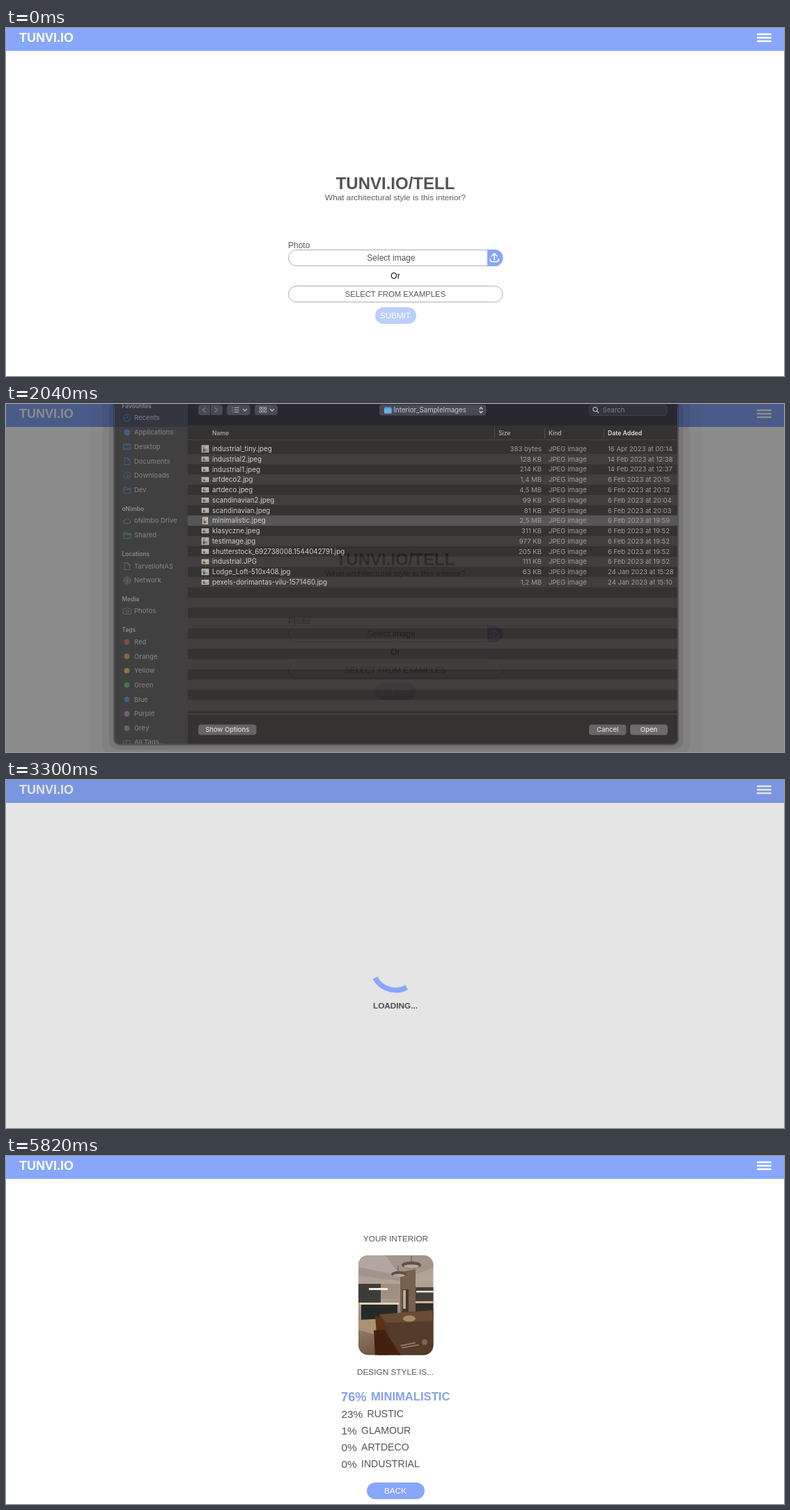
Animation, 1117 px wide and 501 px high, one loop 8000 ms. Source, as an HTML page with a canvas:

```html
<!DOCTYPE html>
<html lang="en">
<head>
<meta charset="utf-8">
<title>Interior style demo</title>
<style>
html, body { margin: 0; width: 100%; height: 100%; overflow: hidden; background: #fff; }
canvas { display: block; }
</style>
</head>
<body>
<canvas id="stage" width="1117" height="501"></canvas>
<script>
const W = 1117, H = 501, LOOP = 8000, STEP = 70;
const BLUE = '#88a7fa', INK = '#545454';
const SANS = '"Liberation Sans", Arial, sans-serif';
const UI = 'Inter, Roboto, sans-serif';
const stage = document.getElementById('stage').getContext('2d');
const sheet = document.createElement('canvas');
sheet.width = W;
sheet.height = H;
const sheetCtx = sheet.getContext('2d');
let c = stage;

const clamp = v => Math.max(0, Math.min(1, v));

// y is the middle of the capital letters
function text(str, x, y, size, color, { align = 'left', weight = 400, font = SANS } = {}) {
  c.font = `${weight} ${size}px ${font}`;
  c.textAlign = align;
  c.fillStyle = color;
  c.fillText(str, x, y + size * 0.36);
}
function rect(x, y, w, h, color) {
  c.fillStyle = color;
  c.fillRect(x, y, w, h);
}
function round(x, y, w, h, r, fill, stroke, line = 1) {
  c.beginPath();
  c.roundRect(x, y, w, h, r);
  if (fill) { c.fillStyle = fill; c.fill(); }
  if (stroke) { c.strokeStyle = stroke; c.lineWidth = line; c.stroke(); }
}
function poly(points, color) {
  c.beginPath();
  points.forEach(([x, y]) => c.lineTo(x, y));
  c.fillStyle = color;
  c.fill();
}
function path(d, x, y, color, line = 1) {
  c.save();
  c.translate(x, y);
  c.strokeStyle = color;
  c.lineWidth = line;
  c.lineCap = c.lineJoin = 'round';
  c.stroke(new Path2D(d));
  c.restore();
}
function dot(x, y, r, color) {
  c.beginPath();
  c.arc(x, y, r, 0, Math.PI * 2);
  c.fillStyle = color;
  c.fill();
}

function drawHeader() {
  rect(0, 0, W, H, '#fff');
  rect(0, 0, W, 33, BLUE);
  text('TUNVI.IO', 19, 14, 18, '#fff', { weight: 700 });
  for (const y of [9, 14, 19]) round(1078, y - 1.3, 21, 2.6, 1, '#fff');
}

function drawForm(chosen) {
  const mid = { align: 'center' };
  text('TUNVI.IO/TELL', 559, 223, 24, INK, { align: 'center', weight: 700 });
  text('What architectural style is this interior?', 559, 244, 11.8, '#5c5c5c', mid);
  text('Photo', 405, 312.5, 12, '#5c5c5c');
  round(405.5, 319.5, 307.5, 23, 11.5, '#fff', '#aaacc0');
  round(691, 319, 22.5, 24, [0, 12, 12, 0], BLUE);
  path('M0 3V-6M-4 -2L0 -6L4 -2M-6 2V3Q-6 6 -3 6H3Q6 6 6 3V2', 701.2, 330.5, '#fff', 1.5);
  text(chosen ? 'minimalistic.jpeg' : 'Select image', 553, 331, 12, INK, mid);
  text('Or', 559, 357, 12, '#111', mid);
  round(405.5, 371.5, 307.5, 23, 11.5, '#fff', '#aaacc0');
  text('SELECT FROM EXAMPLES', 559, 383, 11.3, INK, mid);
  round(530, 402, 59, 24, 12, chosen ? BLUE : '#bccefc');
  text('SUBMIT', 559, 414, 11.6, '#fff', mid);
}

function drawLoading(t) {
  const start = (62 + 555 * (t - 3300) / 1750) * Math.PI / 180;
  rect(0, 0, W, H, 'rgba(0,0,0,.1)');
  c.beginPath();
  c.arc(559.5, 269, 33.5, start, start + Math.PI / 2);
  c.strokeStyle = BLUE;
  c.lineWidth = 7.5;
  c.lineCap = 'butt';
  c.stroke();
  text('LOADING...', 559, 325, 11.75, '#4d4d4d', { align: 'center', weight: 700 });
}

function drawPhoto() {
  c.save();
  c.beginPath();
  c.roundRect(506, 143, 107.5, 143.5, 14);
  c.clip();
  const wall = c.createLinearGradient(506, 143, 540, 286);
  wall.addColorStop(0, '#a69c94');
  wall.addColorStop(0.4, '#b3a596');
  wall.addColorStop(1, '#70543b');
  rect(506, 143, 108, 144, wall);
  poly([[506, 143], [614, 143], [614, 160], [566, 180], [506, 172]], '#a1958d');
  poly([[506, 143], [545, 143], [566, 172], [506, 160]], '#b1a7a0');
  rect(506, 184, 32, 27, '#3d3c39');
  rect(538, 184, 28, 22, '#9f9182');
  rect(521, 190, 27, 3, '#f1eee6');
  rect(587, 189, 27, 22, '#454039');
  rect(589, 194, 25, 2.5, '#eee6d7');
  rect(508, 211, 56, 3, '#e0cfb2');
  rect(510, 214, 52, 22, '#252a28');
  rect(587, 209, 27, 19, '#d2b994');
  rect(587, 212, 27, 17, '#302e2a');
  poly([[506, 236], [545, 234], [532, 258], [506, 250]], '#aa9275');
  poly([[566, 167], [588, 163], [588, 234], [566, 232]], '#76604e');
  rect(569, 192, 9, 34, '#45372d');
  rect(570, 193, 4, 27, '#b9aa97');
  path('M0 0V10M19 -16V-4', 563, 158, '#504740', 0.8);
  for (const [x, y, r] of [[564, 170, 11], [582, 157, 14]]) {
    c.beginPath();
    c.ellipse(x, y, r, r * 0.38, 0, 0, Math.PI * 2);
    c.fillStyle = '#5e5148';
    c.fill();
    c.beginPath();
    c.ellipse(x, y + 2, r * 0.8, r * 0.2, 0, 0, Math.PI * 2);
    c.fillStyle = '#b9a797';
    c.fill();
  }
  path('M0 0L-3 12M8 0L11 12M0 4H9', 547, 224, '#39302a');
  poly([[536, 228], [614, 222], [614, 287], [563, 287], [540, 252]], '#553b2a');
  poly([[536, 228], [614, 222], [614, 238], [546, 240]], '#694a34');
  poly([[530, 229], [541, 235], [551, 264], [548, 287], [534, 287]], '#5e3016');
  poly([[528, 251], [543, 250], [567, 287], [530, 287]], '#44210f');
  c.beginPath();
  c.ellipse(579, 234, 9, 4.5, 0, 0, Math.PI * 2);
  c.fillStyle = '#aa8963';
  c.fill();
  path('M0 4L20 0M2 7L25 3', 567, 269, '#9d8670', 1.5);
  dot(601, 268, 4, '#806451');
  c.restore();
}

function drawResult() {
  const mid = { align: 'center' };
  text('YOUR INTERIOR', 559.5, 118.5, 11.7, INK, mid);
  drawPhoto();
  text('DESIGN STYLE IS...', 559, 311, 11.8, INK, mid);
  const bold = { weight: 700 };
  text('76%', 481, 346, 18.3, '#84a1ec', bold);
  text('MINIMALISTIC', 524, 346, 16.6, '#84a1ec', bold);
  [['23%', 'RUSTIC'], ['1%', 'GLAMOUR'], ['0%', 'ARTDECO'], ['0%', 'INDUSTRIAL']].forEach(([share, style], i) => {
    text(share, 481.5, 371 + 24 * i, 15.4, INK);
    text(style, i ? 510 : 518.5, 371 + 24 * i, 14.1, INK);
  });
  round(518, 470, 83, 24, 12, BLUE);
  text('BACK', 559, 482, 11.8, '#fff', mid);
}

const FILES = `industrial_tiny.jpeg|383 bytes|16 Apr 2023 at 00:14
industrial2.jpeg|128 KB|14 Feb 2023 at 12:38
industrial1.jpeg|214 KB|14 Feb 2023 at 12:37
artdeco2.jpg|1,4 MB|6 Feb 2023 at 20:15
artdeco.jpeg|4,5 MB|6 Feb 2023 at 20:12
scandinavian2.jpeg|99 KB|6 Feb 2023 at 20:04
scandinavian.jpeg|81 KB|6 Feb 2023 at 20:03
minimalistic.jpeg|2,5 MB|6 Feb 2023 at 19:59
klasyczne.jpeg|311 KB|6 Feb 2023 at 19:52
testimage.jpg|977 KB|6 Feb 2023 at 19:52
shutterstock_692738008.1544042791.jpg|205 KB|6 Feb 2023 at 19:52
industrial.JPG|111 KB|6 Feb 2023 at 19:52
Lodge_Loft-510x408.jpg|63 KB|24 Jan 2023 at 15:28
pexels-dorimantas-vilu-1571460.jpg|1,2 MB|24 Jan 2023 at 15:10`.split('\n').map(row => row.split('|'));
const PICKED = 7;

const ICONS = {
  clock: 'M5 0A5 5 0 1 1 -5 0A5 5 0 1 1 5 0M0 -3V0H-2',
  down: 'M5 0A5 5 0 1 1 -5 0A5 5 0 1 1 5 0M0 -2.5V2.5M-2 .5L0 2.5L2 .5',
  desk: 'M-5 -4H5V4H-5ZM-5 -2H5M-5 2.5H5',
  page: 'M-3.5 -5H1L4 -2V5H-3.5ZM1 -5V-2H4',
  folder: 'M-5 4V-4H-1L0 -2.5H5V4ZM-5 -1H5',
  cloud: 'M-3 4H3A2.7 2.7 0 0 0 3.5 -1A3.5 3.5 0 0 0 -3 -1A2.5 2.5 0 0 0 -3 4',
  globe: 'M5 0A5 5 0 1 1 -5 0A5 5 0 1 1 5 0M-5 0H5M0 -5V5M-3.5 -3Q0 0 3.5 -3M-3.5 3Q0 0 3.5 3',
  camera: 'M-5.5 -3H-2.5L-1.5 -4.5H1.5L2.5 -3H5.5V4.5H-5.5ZM2 .5A2 2 0 1 1 -2 .5A2 2 0 1 1 2 .5',
  tags: 'M-1 0A2.5 2.5 0 1 1 -1 -.1M-1 -3H2A3 3 0 0 1 2 3H-1'
};
const SKY = '#2b8ff5', TEAL = '#55c3c9', GREY = '#96969a';
const PLACES = [
  ['Recents', 23, 'clock', SKY], ['Applications', 44, null, SKY], ['Desktop', 64.5, 'desk', SKY],
  ['Documents', 85.5, 'page', SKY], ['Downloads', 106, 'down', SKY], ['Dev', 127, 'folder', SKY],
  ['oNimbo Drive', 171, 'cloud', TEAL], ['Shared', 192, 'folder', TEAL],
  ['TarvelloNAS', 236.5, 'page', GREY], ['Network', 257, 'globe', GREY],
  ['Photos', 301, 'camera', GREY], ['All Tags...', 490, 'tags', GREY]
];
const GROUPS = [['Favourites', 6], ['oNimbo', 154], ['Locations', 219], ['Media', 284], ['Tags', 328]];
const TAGS = [['Red', '#ea5350'], ['Orange', '#f7a02c'], ['Yellow', '#fbe62f'], ['Green', '#2fdc40'],
  ['Blue', '#1f95fc'], ['Purple', '#e274dc'], ['Grey', '#9b9b9c']];

function drawSidebar(active) {
  rect(155, 0, 106, 494, active ? '#363638' : '#2e2e2f');
  const ui = { font: UI, weight: 500 };
  for (const [name, y] of GROUPS) text(name, 166.5, y, 8.4, active ? '#858588' : '#8c8c8e', { font: UI, weight: 600 });
  c.globalAlpha = active ? 1 : 0.42;
  for (const [name, y, icon, color] of PLACES) {
    if (icon) path(ICONS[icon], 174, y, color);
    else dot(174, y, 4.5, color);
    text(name, 184, y, 9.5, '#e8e8e8', ui);
  }
  TAGS.forEach(([name, color], i) => {
    const y = 345.5 + 20.7 * i;
    dot(173.5, y, 3.9, color);
    text(name, 184, y, 9.5, '#e8e8e8', ui);
  });
  c.globalAlpha = 1;
}

function drawToolbar(active) {
  const field = '#49474a';
  round(276, 4, 17, 15, [4, 0, 0, 4], field);
  round(294, 4, 17, 15, [0, 4, 4, 0], field);
  path('M2 -3L-1.5 0L2 3', 284, 11.5, '#858487', 1.2);
  path('M-2 -3L1.5 0L-2 3', 302, 11.5, '#858487', 1.2);
  round(317, 4, 33.5, 15, 4, field);
  round(357, 4, 33, 15, 4, field);
  path('M0 -3H.2M3 -3H9M0 0H.2M3 0H9M0 3H.2M3 3H9', 325, 11.5, '#cfcfd0', 1.1);
  for (let i = 0; i < 6; i++) round(364 + i % 3 * 3.7, 7.5 + (i > 2) * 4.6, 2.5, 3, 0.5, null, '#cfcfd0', 0.9);
  for (const x of [343, 382]) path('M-2.5 -1L0 1.5L2.5 -1', x, 11.5, '#d8d8d8', 1.2);
  round(536, 4, 153.5, 15.5, 4, field);
  if (active) round(676, 5, 12, 13.5, 3, '#1e62d4');
  path('M-2 -1.5L0 -4L2 -1.5M-2 1.5L0 4L2 1.5', 682, 11.8, '#fff', 1.2);
  round(543, 7.5, 10.5, 9, 1.5, '#4bacec');
  rect(543, 9.5, 10.5, 7, '#72c4f6');
  text('Interior_SampleImages', 556.5, 11.8, 9.7, '#e4e4e4', { font: UI });
  round(837, 4.5, 112, 15, 4, '#2b292b', '#3c3a3c');
  path('M2 -.8A3 3 0 1 1 -4 -.8A3 3 0 1 1 2 -.8M1.2 1.5L4 4.3', 847, 11.5, '#d5d5d5', 1.2);
  text('Search', 856.5, 12, 9.6, '#88868a', { font: UI });
}

function drawThumb(i, y) {
  const tall = i === PICKED;
  const h = tall || i === 0 || i === 9 ? 10.5 : i === 12 ? 9 : 7;
  const w = tall ? 8 : 10.5;
  const x = 286 - w / 2;
  rect(x, y - h / 2, w, h, '#dcd9d5');
  rect(x + 1, y - h / 2 + 1, w - 2, h - 2, ['#8d9692', '#9b9388', '#aaaaaa', '#b0a185'][i % 4]);
  rect(x + 2, y, w * 0.3, h / 2 - 1, '#55504c');
  rect(x + w * 0.55, y - h / 2 + 1.5, w * 0.25, h * 0.35, '#d2cdc4');
}

function drawList(selected, active) {
  const ui = { font: UI }, pitch = 14.77, top = 60.1;
  rect(261, 0, 704, 494, active ? '#1e1b1c' : '#221c1b');
  drawToolbar(active);
  rect(261, 34.5, 704, 1, '#383536');
  rect(261, 54, 704, 1, '#383536');
  for (const x of [701, 773, 858]) rect(x, 38, 1, 14, '#454243');
  text('Name', 296, 45, 8.6, '#bebcbd', { font: UI, weight: 500 });
  text('Size', 707, 45, 8.6, '#bebcbd', { font: UI, weight: 500 });
  text('Kind', 779, 45, 8.6, '#bebcbd', { font: UI, weight: 500 });
  text('Date Added', 864, 45, 8.7, '#f0f0f0', { font: UI, weight: 600 });
  for (let i = 1; i < 26; i += 2) rect(261, top + i * pitch, 704, pitch, active ? '#2b2829' : '#322c2b');
  if (selected) rect(261, top + PICKED * pitch, 704, pitch, active ? '#0d58cf' : '#4a4a4b');
  FILES.forEach(([name, size, date], i) => {
    const y = 67.5 + i * pitch;
    const soft = selected && active && i === PICKED ? '#fff' : '#a5a3a4';
    drawThumb(i, y);
    text(name, 296, y, 9.75, '#e4e2e3', ui);
    text(size, 769, y, 9.6, soft, { font: UI, align: 'right' });
    text('JPEG image', 779, y, 9.6, soft, ui);
    text(date, 864, y, 9.5, soft, ui);
  });
  rect(261, 449, 704, 1, '#434041');
  const button = (label, x, w, fill, color) => {
    round(x, 464.5, w, 15, 4, fill);
    text(label, x + w / 2, 472, 9.5, color, { font: UI, weight: 500, align: 'center' });
  };
  button('Show Options', 276, 83.5, '#5d5b5c', '#eee');
  button('Cancel', 837, 53.5, '#5d5b5c', '#eee');
  button('Open', 896, 54, selected ? (active ? '#2068dc' : '#656364') : '#353233', selected ? '#fff' : '#706e6f');
}

function renderSheet(selected, active) {
  c = sheetCtx;
  c.clearRect(0, 0, W, H);
  c.save();
  c.beginPath();
  c.roundRect(155, -20, 810, 513.5, 9);
  c.clip();
  drawSidebar(active);
  drawList(selected, active);
  c.restore();
  round(155.5, -20, 809, 513, 9, null, '#4b494b');
  c = stage;
}

// The shadow stays outside the sheet, so that the page shows through evenly
function drawShadow() {
  for (const [spread, shade] of [[35, 0.03], [17, 0.07], [7, 0.1], [1, 0.35]]) {
    c.beginPath();
    c.roundRect(155 - spread, -60, 810 + spread * 2, 553.5 + spread, 9 + spread / 2);
    c.roundRect(155, -60, 810, 553.5, 9);
    c.fillStyle = `rgba(0,0,0,${shade})`;
    c.fill('evenodd');
  }
}

function drawPicker(t) {
  const opening = clamp((t - 430) / 350);
  const closing = clamp((t - 1970) / 350);
  rect(0, 0, W, H, `rgba(0,0,0,${0.57 * opening * (1 - closing)})`);
  renderSheet(t >= 1830, t < 1970);
  c.save();
  c.globalAlpha = opening * (1 - closing);
  c.translate(0, -15 * (1 - opening + closing));
  drawShadow();
  c.drawImage(sheet, 0, 0);
  c.restore();
}

function draw(time) {
  const t = Math.floor((time - 10) / STEP) * STEP + 10;
  drawHeader();
  if (t < 3300) {
    drawForm(t >= 2320);
    if (t >= 500 && t < 2320) drawPicker(t);
  } else if (t < 5750) {
    drawLoading(t);
  } else {
    drawResult();
  }
}

let began;
function tick(now) {
  began ??= now;
  draw((now - began) % LOOP);
  requestAnimationFrame(tick);
}
draw(0);
requestAnimationFrame(tick);
</script>
</body>
</html>
```
